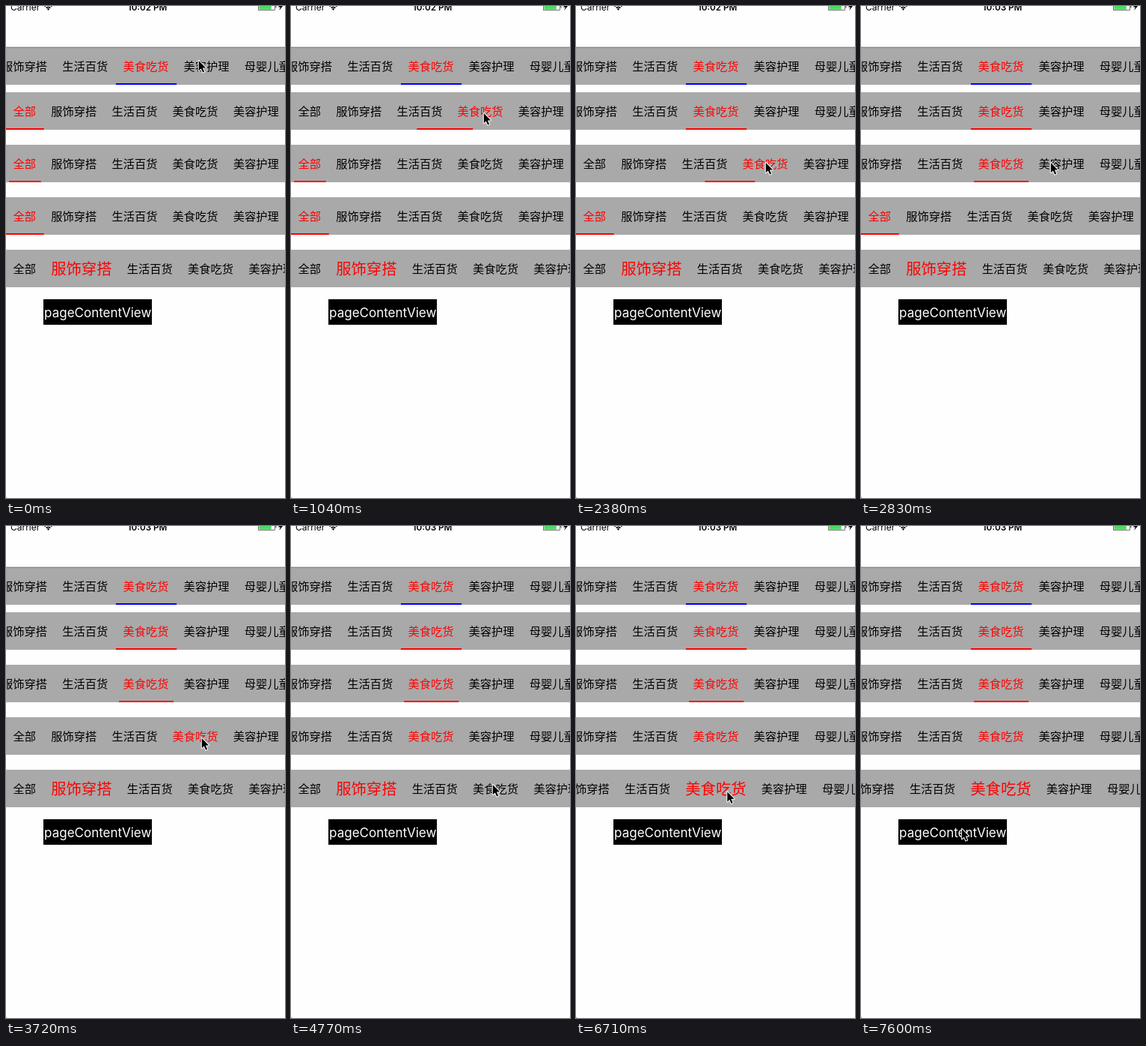
An HTML page with a canvas that plays this animation: 373x656 px, repeating every 8 s.

```html
<!DOCTYPE html>
<html lang="zh-CN">
<head>
<meta charset="utf-8">
<title>Tab bars</title>
<style>
html, body { margin: 0; width: 100%; height: 100%; overflow: hidden; background: #fefefe; }
canvas { display: block; width: 373px; height: 656px; }
</style>
</head>
<body>
<canvas id="stage"></canvas>
<script>
const WIDTH = 373, HEIGHT = 656, LOOP = 8000, TICK = 149;
const LABELS = ['全部', '服饰穿搭', '生活百货', '美食吃货', '美容护理', '母婴儿童'];
const FONT = 15.25, BIG_FONT = FONT * 4 / 3, GAP = 20.2;
const RED = '#ff0000', BLUE = '#0000ff', TARGET = 3;

const ROWS = [
  { line: BLUE, chosen: true },
  { line: RED },
  { line: RED, shortLine: true },
  { line: RED, dropsLine: true },
  { big: true }
];
const rowTop = i => i ? 45 + 70 * i : 55;

// The pointer visits one row after another, then the label.
const STOPS = [[257, 72], [257, 142], [253, 208], [261, 282], [269, 344], [134, 403]];
const arrival = i => i < ROWS.length ? 9 * i - 4 : 51;
const travel = i => i < ROWS.length ? 3 : 10;
const tapTick = i => arrival(i) + (ROWS[i].big ? 4 : 2);

const canvas = document.getElementById('stage');
const ctx = canvas.getContext('2d');
const ratio = window.devicePixelRatio || 1;
canvas.width = WIDTH * ratio;
canvas.height = HEIGHT * ratio;

const clamp = v => Math.max(0, Math.min(1, v));
const ease = v => (1 - Math.cos(Math.PI * clamp(v))) / 2;
const mix = (a, b, v) => a + (b - a) * v;

function rect(color, x, y, w, h) {
  ctx.fillStyle = color;
  ctx.fillRect(x, y, w, h);
}

function text(value, x, y, font, color, align = 'left') {
  ctx.font = font;
  ctx.fillStyle = color;
  ctx.textAlign = align;
  ctx.fillText(value, x, y);
}

function polygon(...points) {
  ctx.beginPath();
  points.forEach(([x, y]) => ctx.lineTo(x, y));
  ctx.closePath();
}

function layout(selected, big) {
  let x = GAP / 2;
  return LABELS.map((label, i) => {
    const size = big && i === selected ? BIG_FONT : FONT;
    const item = { label, size, x, width: size * label.length };
    x += item.width + GAP;
    return item;
  });
}

function drawRow(row, index, tick) {
  const since = row.chosen ? Infinity : tick - tapTick(index);
  const tapped = since >= 0;
  const selected = tapped ? TARGET : row.big ? 1 : 0;
  const items = layout(selected, row.big);
  const top = rowTop(index);
  const hasLine = row.line && !(tapped && row.dropsLine);

  // Scrolling brings the chosen item to the middle.
  const target = items[TARGET];
  const middle = target.x + target.width / 2 - (WIDTH + 2) / 2;
  const offset = tapped ? middle * ease(since / (hasLine ? 2.25 : 2)) : 0;

  rect('#a9a9a9', 0, top, WIDTH, 50);
  items.forEach((item, i) => {
    text(item.label, item.x - 0.6 - offset, top + 25.2 + item.size * 0.38,
      `${item.size}px "Noto Sans CJK SC", "Noto Sans CJK", sans-serif`,
      i === selected ? RED : '#000');
  });

  if (hasLine) {
    const moved = !tapped ? 0 : since === 0 ? 0.79 : 1;
    const pad = row.shortLine ? 6 : GAP / 2;
    rect(row.line, mix(items[0].x, target.x, moved) - pad - offset, top + 48,
      mix(items[0].width, target.width, moved) + 2 * pad, 2);
  }
}

function drawStatusBar(tick) {
  text('Carrier', 6, 5.5, '12px Inter, sans-serif', '#000');
  text(tick < 19 ? '10:02 PM' : '10:03 PM', 189, 5.5, '600 11.7px Inter, sans-serif', '#000', 'center');

  ctx.strokeStyle = '#000';
  ctx.lineWidth = 1.7;
  for (const radius of [4, 7]) {
    ctx.beginPath();
    ctx.arc(56.5, 5.5, radius, -Math.PI * 0.75, -Math.PI * 0.25);
    ctx.stroke();
  }
  ctx.fillStyle = '#000';
  polygon([56.5, 6], [54.8, 3.8], [56.5, 3], [58.2, 3.8]);
  ctx.fill();

  ctx.strokeStyle = '#555';
  ctx.lineWidth = 0.8;
  ctx.strokeRect(337.5, -4, 22, 9.5);
  rect('#4cd964', 338.4, -3, 16.4, 7.7);
  rect('#555', 360.3, -1, 1.2, 3.5);
  ctx.fillStyle = '#000';
  polygon([368, -4], [364, 1.5], [366.8, 1.5], [365.2, 6], [370, 0], [367.2, 0]);
  ctx.fill();
}

function drawPointer(tick) {
  let [x, y] = STOPS[0];
  for (let i = 1; i < STOPS.length; i++) {
    const progress = clamp(1 - (arrival(i) - tick) / travel(i));
    x = mix(x, STOPS[i][0], ease(progress * 1.25));
    y = mix(y, STOPS[i][1], progress ** 2);
  }
  ctx.save();
  ctx.translate(x + 0.8, y + 1);
  polygon([0, 0], [0, 13.2], [3, 10.4], [5.3, 15.6], [7.3, 14.7], [5.1, 9.6], [9.3, 9.4]);
  ctx.lineJoin = 'round';
  ctx.lineWidth = 2;
  ctx.strokeStyle = '#fff';
  ctx.stroke();
  ctx.fillStyle = '#000';
  ctx.fill();
  ctx.restore();
}

function draw(now) {
  // The screen refreshes in coarse steps.
  const tick = Math.floor((now % LOOP + 8) / TICK);
  ctx.setTransform(ratio, 0, 0, ratio, 0, 0);
  rect('#fefefe', 0, 0, WIDTH, HEIGHT);
  drawStatusBar(tick);
  ROWS.forEach((row, i) => drawRow(row, i, tick));
  rect('rgba(0, 0, 0, 0.4)', 0, 54.5, WIDTH, 1);
  rect('#000', 50, 391, 145, 34);
  text('pageContentView', 122.7, 414.5, '17px Inter, sans-serif', '#fff', 'center');
  rect('#888', 0, 655, 1, 1);
  drawPointer(tick);
}

const began = performance.now();
function frame() {
  draw(performance.now() - began);
  requestAnimationFrame(frame);
}
frame();
</script>
</body>
</html>
```
